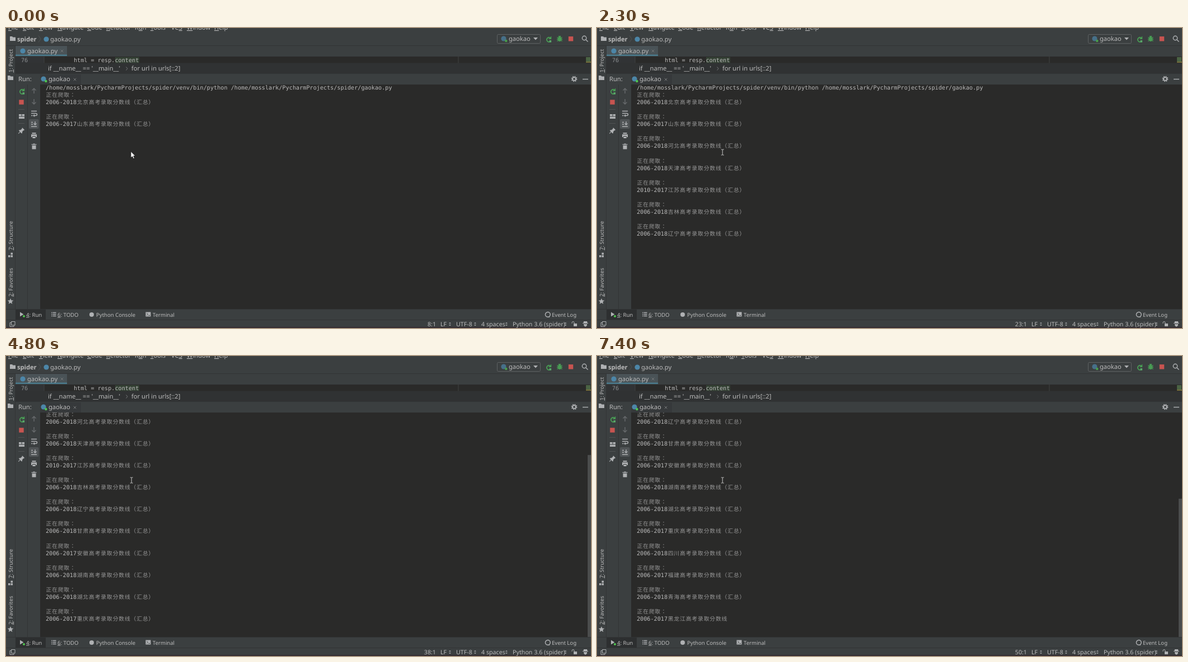
Animation, 1045 px wide and 536 px high, one loop 8 s. Source, as an HTML page:

```html
<!DOCTYPE html>
<html lang="zh-Hant">
<head>
<meta charset="utf-8">
<title>Run console</title>
<style>
html, body { margin: 0; width: 100%; height: 100%; overflow: hidden; background: #3b3f40; }
svg { display: block; }
text { font: 11.15px "Noto Sans", "Open Sans", sans-serif; fill: #bbb; white-space: pre; text-rendering: geometricPrecision; }
.s { font-size: 9.55px; }
.m { font-size: 10.7px; }
.b { font-weight: 700; }
.mono { font: 10.19px "DejaVu Sans Mono", monospace; }
.zh { font: 300 9.8px "Noto Sans CJK TC", "Noto Sans CJK SC", "Noto Sans CJK", sans-serif; letter-spacing: .86px; fill: #979797; }
.u { text-decoration: underline; }
.i { fill: none; stroke: #afb1b3; stroke-width: 1.4; }
.f { fill: #afb1b3; }
.dim { stroke: #686b6d; }
.green { stroke: #499c54; }
.thin { stroke-width: 1; }
.thick { stroke-width: 1.9; }
.x { fill: none; stroke: #77797a; }
.rule { stroke: #505354; }
</style>
</head>
<body>
<svg id="stage" width="1045" height="536" viewBox="0 0 1045 536">
<defs>
  <circle id="py" r="4.6" fill="#4c86a8"/>
  <g id="pyrun"><use href="#py"/><circle cx="4.3" cy="4" r="2.2" fill="#4fc44f"/></g>
  <g id="rerun"><path class="i green thick" d="M3 4.2A4 4 0 1 1 2.6 -2.8"/><path fill="#499c54" d="M5.2 -5.5V0H-.3z"/><rect x="1.5" y="2" width="3.6" height="3.6" fill="#59a869"/></g>
  <rect id="stop" x="-4.2" y="-4.2" width="8.400" height="8.400" fill="#c75450"/>
  <path id="cross" class="x" d="M-2.3 -2.3 2.3 2.3M2.3 -2.3-2.3 2.3"/>
  <path id="folder" class="f" d="M-5 -4H-1L.5 -2.5H5V4H-5z"/>
  <path id="spin" class="f" d="M-2 -.9 0 -3 2 -.9zM-2 .9 0 3 2 .9z"/>
</defs>

<!-- panels -->
<path fill="#323435" d="M0 31h1045v1H0zM16 32h1v470h-1zM17 81h1028v1H17zM38 101h1v401h-1zM0 502h1045v1H0zM0 521h1045v1H0z"/>
<rect x="17" y="32" width="92" height="18" fill="#4a5357"/>
<rect x="17" y="47.5" width="92" height="2.5" fill="#4a7a8c"/>
<rect x="17" y="51" width="1028" height="12" fill="#2a2a29"/>
<rect x="17" y="51" width="51" height="12" fill="#313335"/>
<path fill="#414242" d="M67.500 51h1v12h-1zM807.500 51h1v12h-1z"/>
<rect x="195" y="52" width="43" height="11" fill="#344134"/>
<rect x="1036" y="52" width="8" height="8" fill="#4b6344"/>
<rect x="1036" y="60" width="9" height="2" fill="#756d3a"/>
<rect x="17" y="62.5" width="1028" height="18.5" fill="#303233"/>
<rect x="61" y="83" width="73" height="18" fill="#36393b"/>
<rect x="61" y="101" width="984" height="401" fill="#2a2a29"/>
<rect x="17" y="503" width="54" height="18" fill="#2d2f30"/>
<rect y="534" width="1045" height="2" fill="#352d32"/>

<!-- navigation bar -->
<g id="menu"></g>
<use href="#folder" x="12" y="19"/>
<text class="b" x="20" y="24">spider</text>
<path class="x rule" d="M58 13.5 62 19.5 58 25.5"/>
<use href="#py" x="72" y="20"/>
<text x="79" y="24">gaokao.py</text>
<rect x="877.5" y="11.5" width="77" height="16" rx="2" fill="none" stroke="#5e6162"/>
<use href="#pyrun" x="889" y="19" opacity=".7"/>
<text x="898" y="23">gaokao</text>
<path class="f" d="M942 17h8l-4 4.5z"/>
<use href="#rerun" x="969" y="20"/>
<ellipse cx="989" cy="20" rx="3" ry="4" fill="#499c54"/>
<path class="i green" d="M984.5 16.5l9 7M993.5 16.5l-9 7M984 20h10M987 14.5l4 2M991 14.5l-4 2"/>
<use href="#stop" x="1009" y="19.300"/>
<circle class="i" cx="1033" cy="18" r="3.7"/><path class="i" d="M1035.7 20.7 1039.5 24.5"/>

<!-- editor -->
<use href="#py" x="30" y="41"/>
<text x="38" y="45">gaokao.py</text>
<use href="#cross" x="100" y="41"/>
<text class="mono" x="27" y="61" style="fill:#8b8e90">76</text>
<text class="mono" x="121" y="61">html = resp.content</text>
<text x="75" y="76">if __name__ == '__main__'</text>
<path class="x" d="M214.5 69.5 217 72.5 214.5 75.5"/>
<text x="224" y="76">for url in urls[::2]</text>

<!-- run header -->
<text x="22" y="95">Run:</text>
<use href="#pyrun" x="67" y="91"/>
<text x="76" y="95">gaokao</text>
<use href="#cross" x="123" y="92"/>
<circle class="i thick" cx="1015" cy="91" r="2.9"/>
<circle class="i thick" cx="1015" cy="91" r="4.4" stroke-dasharray="1.73"/>
<path class="i" d="M1030 91.5h10"/>

<!-- run toolbar -->
<use href="#rerun" x="28" y="113"/>
<use href="#stop" x="27.500" y="132.500"/>
<path class="x rule" d="M22 145.5h11M22 170.5h11"/>
<path class="f" d="M23 154h4.5v3.5H23zM28.5 154H33v3.5h-4.5zM23 158.5h10v3.5H23z"/>
<path class="f" d="M29 178l4 4-1 1-1 0-2 2.5 0 2-1 1-2.5-2.5-3 3-.7-.7 3-3-2-2 1-1h2l2.500-2z"/>
<path class="i dim" d="M50 117v-9M46.5 111.5 50 108l3.5 3.5M50 127v9M46.5 132.5 50 136l3.5-3.5"/>
<path class="i" d="M45 148.5h10M45 152.5h8q2.500 0 2.500 2t-2.500 2h-3M45 156.5h2.500"/><path class="f" d="M48 156.5l3-2.500v5z"/>
<rect x="41" y="163" width="17.5" height="17" rx="2" fill="#505456"/>
<path class="i" d="M45 168.5h3M45 172h3M45 176h10M52 167v6M49.5 170.5 52 173l2.500-2.500"/>
<path class="f" d="M46.5 187h7v2h-7zM45 190h10v5h-2v-2h-6v2h-2zM47.5 194h5v3h-5z"/>
<path class="f" d="M45.5 207.5h3v-1h3v1h3v1.300h-9zM46.5 209.7h7V216.5h-7z"/>

<!-- left stripe -->
<text class="s" transform="translate(12 79.5) rotate(-90)"><tspan class="u">1</tspan>: Project</text>
<use href="#folder" x="8" y="89"/>
<text class="s" transform="translate(12 397) rotate(-90)"><tspan class="u">7</tspan>: Structure</text>
<path class="f" d="M8.5 401.5h3.500v3.500H8.5zM4 406h3.500v3.500H4zM8.5 406h3.500v3.500H8.5z"/>
<text class="s" transform="translate(12 480) rotate(-90)"><tspan class="u">2</tspan>: Favorites</text>
<path class="f" d="M8 483l1.500 3.500 3.800.3-2.900 2.500.9 3.700L8 491l-3.300 2 .9-3.700-2.900-2.500 3.800-.3z"/>

<!-- bottom bars -->
<path class="f" d="M25 507.5l6.500 4-6.500 4z"/><circle cx="32" cy="515" r="2" fill="#4fc44f"/>
<text class="s" x="36" y="515.5"><tspan class="u">4</tspan>: Run</text>
<path class="i" stroke-dasharray="1.5 1 6 10" d="M81 508.5h9M81 511.5h9M81 514.5h9"/>
<text class="s" x="92" y="515.5"><tspan class="u">6</tspan>: TODO</text>
<circle class="f" cx="153" cy="512" r="4"/>
<text class="s" x="161" y="515.5">Python Console</text>
<rect class="f" x="249.5" y="507.5" width="9" height="8"/><path d="M251.5 509.5l2 2-2 2M254.5 513.5h2.500" fill="none" stroke="#3b3f40"/>
<text class="s" x="262" y="515.5">Terminal</text>
<path class="i" d="M970.5 515.5A4.400 4.400 0 1 0 967 516.300L970.5 516.300z"/>
<text class="s" x="975" y="515.5">Event Log</text>
<path class="i thin" d="M9.5 524.5h6.500v6.500h-6.500zM9 526.5H7v7h7v-2"/>
<text id="pos" class="m" x="768" y="533" text-anchor="end"></text>
<text class="m" x="776" y="533">LF</text><use href="#spin" x="793" y="529"/>
<text class="m" x="804" y="533">UTF-8</text><use href="#spin" x="838" y="529"/>
<text class="m" x="849" y="533">4 spaces</text><use href="#spin" x="894" y="529"/>
<text class="m" x="905" y="533">Python 3.6 (spider)</text><use href="#spin" x="999.5" y="529"/>
<path class="f" d="M1014 528h6v5h-6z"/><path class="i thin" d="M1015 528v-1.500a2 2 0 0 0-4 0v1.500"/>
<path class="f" d="M1032 524h6l.5 3h1.500v1h-10v-1h1.500zM1032 529h6v2l-2 2.500h-2l-2-2.500z"/>

<!-- console -->
<svg x="61" y="101" width="984" height="401" viewBox="61 101 984 401">
  <g id="log"></g>
  <rect id="thumb" x="1039" width="6" fill="#4b4d4d"/>
</svg>

<path id="arrow" d="M223 220.5v11.500l2.700-2.500 1.800 4 2-.9-1.800-3.900h3.500z" fill="#fff" stroke="#111" stroke-width=".8"/>
<path id="beam" d="M221.8 217h1.800l.6.600.6-.6h1.800M224.2 217.500v9M221.800 227h1.800l.6-.6.6.6h1.800" fill="none" stroke="#ddd" stroke-width=".9"/>
</svg>

<script>
const $ = id => document.getElementById(id);
const LOOP = 8000, TOP = 101, VIEW = 401, LINE = 13.035;
const menu = [[4, "&File"], [30, "&Edit"], [59, "&View"], [92, "&Navigate"], [145, "&Code"], [179, "&Refactor"],
  [230, "R&un"], [258, "&Tools"], [295, "VC&S"], [323, "&Window"], [372, "&Help"]];
$("menu").innerHTML = menu.map(([x, s]) =>
  `<text x="${x}" y="3">${s.replace(/&(.)/, '<tspan class="u">$1</tspan>')}</text>`).join("");

// time each entry appears, years, region
const entries = [
  [0, "2006-2018", "北京"], [0, "2006-2017", "山东"], [400, "2006-2018", "河北"], [600, "2006-2018", "天津"],
  [1000, "2010-2017", "江苏"], [1500, "2006-2018", "吉林"], [2300, "2006-2018", "辽宁"], [2700, "2006-2018", "甘肃"],
  [3100, "2006-2017", "安徽"], [3500, "2006-2018", "湖南"], [4000, "2006-2018", "湖北"], [4800, "2006-2017", "重庆"],
  [5400, "2006-2018", "四川"], [5700, "2006-2017", "福建"], [6100, "2006-2018", "青海"], [7400, "2006-2017", "黑龙江"]
];
const home = "/home/mosslark/PycharmProjects/spider/";
const baseline = line => 110.2 + line * LINE;
$("log").innerHTML = `<text class="mono" x="71" y="${baseline(0)}">${home}venv/bin/python ${home}gaokao.py</text>` +
  entries.map(([, years, region], k) => {
    const y = baseline(3 * k + 2), tail = region.length > 2 ? "" : "（汇总）";
    return `<g><text class="zh" x="71.4" y="${y - LINE}">正在爬取：</text>` +
      `<text class="mono" x="71" y="${y}">${years}</text>` +
      `<text class="zh" x="126.700" y="${y}">${region}高考录取分数线${tail}</text></g>`;
  }).join("");
const groups = [...$("log").querySelectorAll("g")];
const show = (el, on) => el.setAttribute("visibility", on ? "visible" : "hidden");

function draw() {
  const t = performance.now() % LOOP;
  const count = entries.filter(e => e[0] <= t).length;
  groups.forEach((g, k) => show(g, k < count));

  const scroll = Math.max(0, 15.3 + (count - 10) * 3 * LINE);
  const total = VIEW + scroll;
  $("log").setAttribute("transform", `translate(0 ${-scroll})`);
  $("thumb").setAttribute("y", TOP + VIEW * scroll / total);
  $("thumb").setAttribute("height", VIEW * VIEW / total);
  show($("thumb"), scroll > 0);

  $("pos").textContent = `${3 * count + 2}:1`;
  show($("arrow"), t < 100);
  show($("beam"), t >= 100);
  requestAnimationFrame(draw);
}
draw();
</script>
</body>
</html>
```
